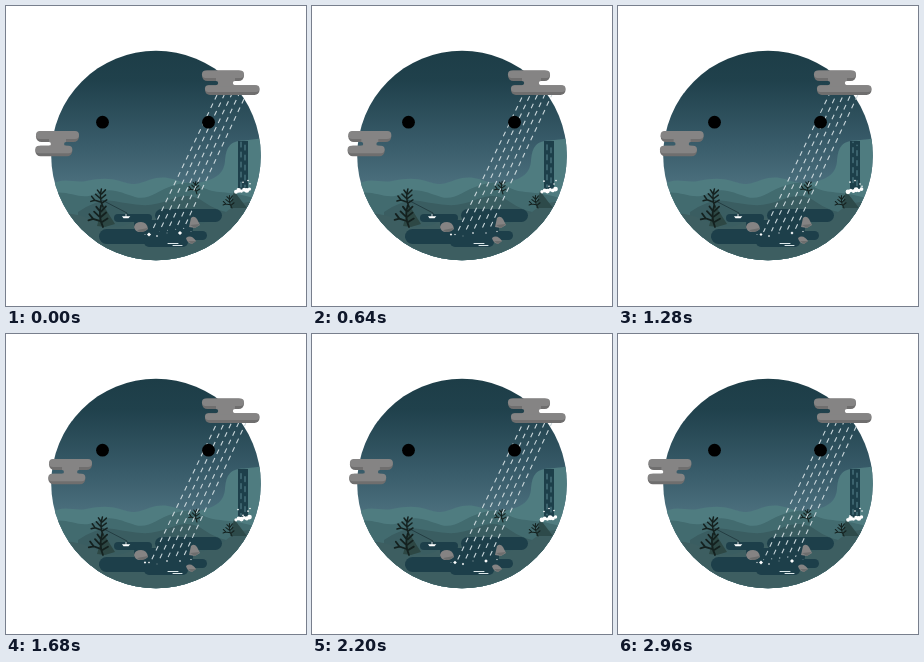
These frames come from a looping animation (300x300 px, 3 s). An HTML page:

```html
<!DOCTYPE html>
<html lang="en">
<head>
<meta charset="utf-8">
<title>Rainy valley</title>
<style>
html, body { margin: 0; width: 100%; height: 100%; overflow: hidden; background: #fff; }
svg { display: block; width: 100vw; height: 100vh; }
.line { fill: none; stroke-linecap: round; }
</style>
</head>
<body>
<svg viewBox="0 0 300 300">
  <defs>
    <linearGradient id="sky" gradientUnits="userSpaceOnUse" x1="0" y1="45" x2="0" y2="185">
      <stop offset="0" stop-color="#1d3d47"/>
      <stop offset=".22" stop-color="#20414c"/>
      <stop offset=".65" stop-color="#385b69"/>
      <stop offset="1" stop-color="#4e7280"/>
    </linearGradient>
    <clipPath id="disc"><circle cx="150" cy="149.5" r="104.8"/></clipPath>
    <g id="twigs" class="line" stroke="#14211f" stroke-width="1.5">
      <path d="M0 0Q-4-9-1-18M-2-5L-8-7L-11-11M-8-7L-12-6M-3-9L-7-13M-2-13L-5-17M-2-8L3-12M-1-13L3-17M-1-4L4-7"/>
    </g>
  </defs>

  <g clip-path="url(#disc)">
    <path fill="url(#sky)" d="M40 40H260V260H40Z"/>
    <path fill="#4f7c80" d="M40 184C54 168 66 178 80 175S104 172 114 175S126 179 134 177S150 170 162 172S176 178 190 177C212 174 218 166 219 155S222 134.5 238 134.5L260 132V260H40Z"/>
    <path fill="#426b6f" d="M40 190C58 180 73 196 89 188S115 187 129 191S152 184 166 180S184 175 198 182S225 183 260 196V260H40Z"/>
    <path fill="#3a5d61" d="M72 206Q92 192 108 195T136 199T166 193T198 196T228 207L240 224H72Z"/>
    <path fill="#3d5e61" d="M40 212Q61 202 86 214T126 216T170 215T220 206T260 202V260H40Z"/>

    <g fill="#1d3f4a">
      <rect x="108" y="208" width="38" height="8" rx="4"/>
      <rect x="149" y="203" width="67" height="13" rx="6.5"/>
      <rect x="128" y="214" width="59" height="13" rx="4"/>
      <rect x="93" y="223" width="74" height="15" rx="7.5"/>
      <rect x="160" y="225" width="41" height="9" rx="4.5"/>
      <rect x="138" y="228" width="44" height="13" rx="5"/>
      <rect x="232" y="135" width="10" height="49"/>
    </g>
    <g id="falls" class="line" stroke="#55808a" stroke-width="1.1" stroke-dasharray="5 5">
      <path d="M235 136V181M239 139V181"/>
    </g>

    <path fill="#2d4a4a" d="M228 185L241 202H224Z"/>
    <use href="#twigs" transform="translate(226 202) rotate(-8) scale(.7)"/>
    <path fill="#2d4744" d="M97 199L109 218L99 221L91 220Z"/>
    <path class="line" stroke="#1b3035" stroke-width=".7" d="M96 194L121 207V210"/>
    <path fill="#fff" d="M116 210.3H124.3L122.5 212.3H117.5ZM119.6 208H120.4V211H119.6Z"/>

    <g fill="#858383">
      <path d="M128 221Q129 216 135 216T142 223Q139 226 134 226T128 221Z"/>
      <path d="M183 221L185 212Q188 209 191 213L194 219L189 222Z"/>
      <path d="M180 232Q185 228 190 235L186 238Q181 237 180 232Z"/>
    </g>
    <path fill="#6d6e6e" d="M131 224L142 222Q140 226 134 226ZM184 219L194 218L189 222ZM182 235L190 235L186 238Z"/>
    <path class="line" stroke="#dce8ea" stroke-width="1" d="M162 237.5H172M167 239.5H176"/>
  </g>

  <g id="plants">
    <g><use href="#twigs" transform="translate(97 221) scale(1.2)"/></g>
    <g><use href="#twigs" transform="translate(97 201)"/></g>
    <g><use href="#twigs" transform="translate(191 188) scale(.7)"/></g>
  </g>
  <g id="foam" fill="#fff"></g>
  <g id="rain" class="line" stroke="#c9d6da" stroke-width="1.1" style="stroke-linecap:butt"></g>
  <g id="splash" fill="#fff"></g>

  <circle cx="96.5" cy="116.2" r="6.4"/>
  <circle cx="202.5" cy="116.2" r="6.4"/>
  <g id="clouds"></g>
</svg>
<script>
const NS = "http://www.w3.org/2000/svg";
const LOOP = 3000, DASH = 5, GAP = 4.5;
const $ = id => document.getElementById(id);

function add(parent, tag, attrs) {
  const el = document.createElementNS(NS, tag);
  for (const key in attrs) el.setAttribute(key, attrs[key]);
  return parent.appendChild(el);
}

// Two pills [x, y, width, height] and a waisted neck from x to x + width.
function cloud(pills, [x, width]) {
  const g = add($("clouds"), "g", {});
  const [, top, , depth] = pills[0];
  const y = top + depth, gap = pills[1][1] - y, r = gap / 2;
  for (const [fill, inset] of [["#6f6e6e", 0], ["#858484", 3]])
    for (const [x, y, width, h] of pills) {
      const height = h - inset;
      add(g, "rect", { x, y, width, height, fill, rx: height / 2 });
    }
  const arc = `a${r} ${r} 0 0 0 0`;
  add(g, "path", {
    fill: "#858484",
    d: `M${x} ${y}v-3h${width}v3${arc} ${gap}v1h${-width}v-1${arc} ${-gap}Z`
  });
  return g;
}

const drifter = cloud([[30, 125, 43, 11], [29.3, 139.8, 37, 10.4]], [43, 17]);
cloud([[196, 64.5, 42, 10.4], [199, 79.2, 54.5, 9.8]], [210, 19]);

const rain = [0, 1, 2, 3, 4].map(i => add($("rain"), "path", {
  d: `M${211 + i * 7.2} 89L${145.5 + i * 8} ${226 - i * .8}`,
  "stroke-dasharray": `${DASH} ${GAP}`
}));

// Splash points: x, y, radius, phase.
const drops = [
  [143, 228.5, 2.1, 0], [151, 230, 1.2, .1], [174, 227, 2.1, 0],
  [161, 227, 1.1, .5], [139, 228.5, 1.2, .6], [185, 225.5, 1, .4]
].map(([x, y, r, phase]) => ({
  x, y, phase,
  el: add($("splash"), "path", { d: `M0-${r}L${r} 0L0 ${r}L-${r} 0Z` })
}));

const bubbles = [0, 1, 2, 3, 4, 5].map(i => add($("foam"), "circle", {
  cx: 230 + i * 2.7, cy: 185.8 - i * .35 - i % 2
}));
const spray = [232, 237, 242, 244].map(cx => add($("foam"), "circle", { cx, r: .8 }));

function draw(ms) {
  const t = ms % LOOP / LOOP;
  const tri = 1 - Math.abs(1 - 2 * t);
  const wave = (n, phase = 0) => Math.sin(2 * Math.PI * (t * n + phase));

  drifter.setAttribute("transform", `translate(${14.8 * tri} 0)`);
  rain.forEach((line, i) =>
    line.setAttribute("stroke-dashoffset", i * 1.3 - t * 6 * (DASH + GAP)));
  $("falls").setAttribute("stroke-dashoffset", -t * 60);

  drops.forEach(({ el, x, y, phase }) => {
    const size = .68 + .32 * Math.cos(2 * Math.PI * (t * 3 - phase - .05));
    el.setAttribute("transform", `translate(${x} ${y}) scale(${size})`);
  });
  bubbles.forEach((b, i) => b.setAttribute("r", 2 + .4 * wave(3, i / 3)));
  spray.forEach((s, i) => {
    const p = (t * 3 + i * .27) % 1;
    s.setAttribute("cy", 183 - 34 * p * (1 - p));
  });

  const pivots = [[97, 220], [96, 200], [191, 188]];
  [...$("plants").children].forEach((plant, i) =>
    plant.setAttribute("transform", `rotate(${-2 + 4 * tri} ${pivots[i]})`));
}

let start;
function tick(now) {
  start ??= now;
  draw(now - start);
  requestAnimationFrame(tick);
}
draw(0);
requestAnimationFrame(tick);
</script>
</body>
</html>
```
